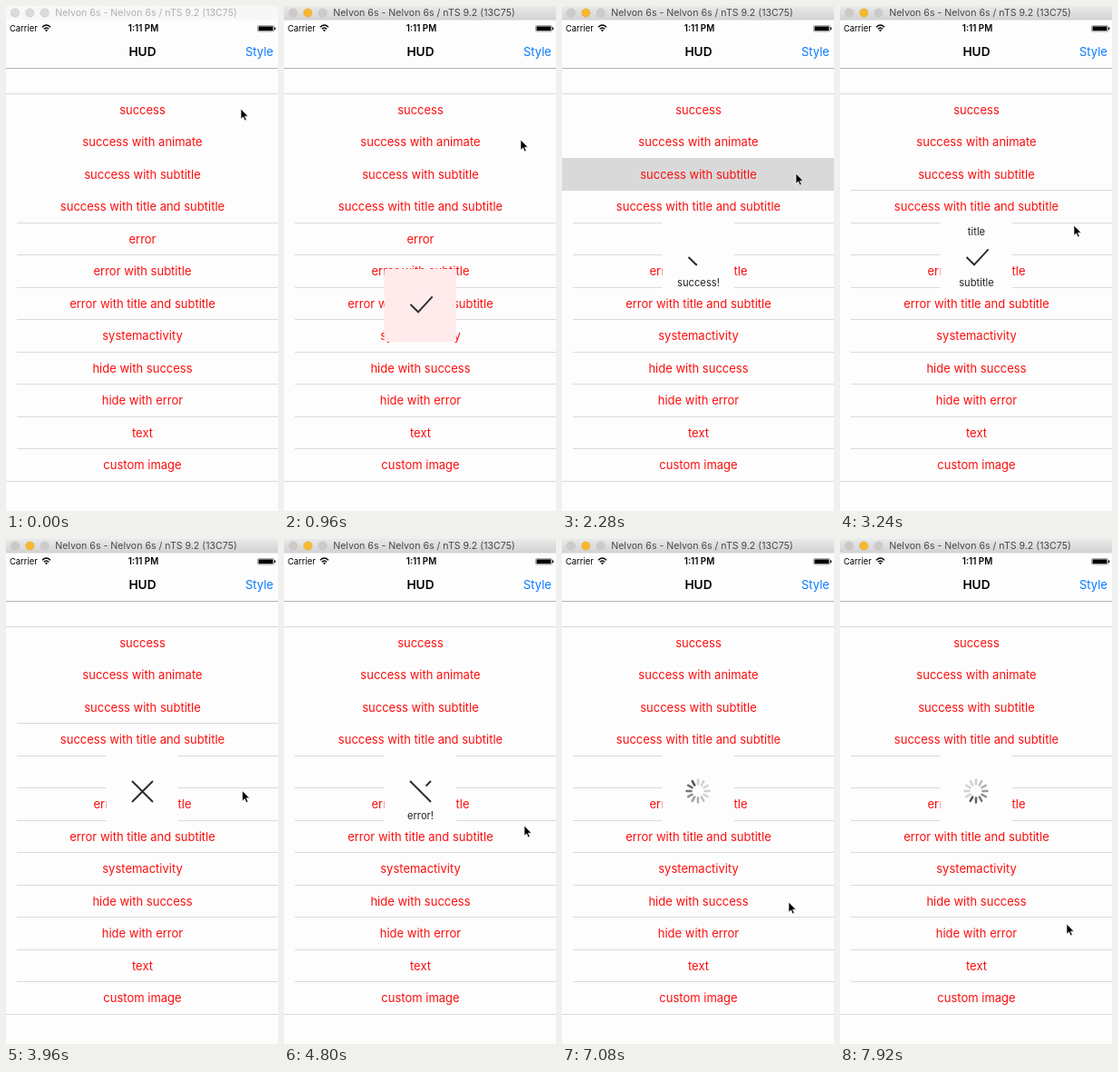
Animation, 300 px wide and 555 px high, one loop 8000 ms. Source, as an HTML page:

```html
<!DOCTYPE html>
<html lang="en">
<head>
<meta charset="utf-8">
<title>HUD demo</title>
<style>
  html, body { margin: 0; width: 100%; height: 100%; overflow: hidden; background: #fdfdfd; }
  svg { display: block; width: 300px; height: 555px; font-family: Inter, Roboto, sans-serif; }
  .mid { text-anchor: middle; }
  .row { font-size: 13px; fill: #fd0e0e; }
  .note { font-size: 11.2px; fill: #262323; }
  .line { stroke: #dadada; stroke-width: 1; }
  .mark { fill: none; stroke: #2e2a2a; stroke-width: 1.9; }
</style>
</head>
<body>
<svg viewBox="0 0 300 555">
  <defs>
    <linearGradient id="chrome" x2="0" y2="1">
      <stop offset="0" stop-color="#e9e9e9"/>
      <stop offset="1" stop-color="#d2d2d2"/>
    </linearGradient>
  </defs>
  <rect width="300" height="555" fill="#fdfdfd"/>

  <rect id="bar" width="300" height="15.5"/>
  <g id="lights" stroke-width=".6">
    <circle cx="10" cy="7.5" r="4.6"/>
    <circle cx="26.3" cy="7.5" r="4.6"/>
    <circle cx="42.6" cy="7.5" r="4.6"/>
  </g>
  <text id="caption" class="mid" x="154.5" y="11.3" font-size="10.6">Nelvon 6s - Nelvon 6s / nTS 9.2 (13C75)</text>

  <text x="4" y="28" font-size="9.4">Carrier</text>
  <g fill="none" stroke="#000" stroke-width="1.4">
    <path d="M40 23.2Q44.5 18.8 49 23.2"/>
    <path d="M41.8 25.2Q44.5 22.6 47.2 25.2"/>
  </g>
  <path d="M43 26.4Q44.5 25.2 46 26.4L44.5 28.2Z"/>
  <text class="mid" x="151.5" y="28" font-size="9.8" font-weight="600">1:11 PM</text>
  <rect x="277.5" y="21.5" width="18" height="6.5" rx="1" fill="none" stroke="#8a8a8a" stroke-width=".7"/>
  <rect x="278.5" y="22.4" width="16" height="4.8"/>
  <rect x="296" y="23.4" width="1.2" height="2.8"/>

  <text class="mid" x="150.5" y="55" font-size="13.7" font-weight="600">HUD</text>
  <text x="264" y="55" font-size="13" fill="#0a7aff">Style</text>
  <path d="M0 68.5H300" stroke="#b4b4b4"/>

  <rect id="glow" width="300" height="36" fill="#d9d9d9"/>
  <g id="list"></g>

  <g id="hud">
    <rect id="box" x="110.5" y="237" width="79.5" height="80" rx="2"/>
    <text id="head" class="note mid" x="150.5" y="251.5"></text>
    <path id="a" class="mark" pathLength="1"/>
    <path id="b" class="mark" pathLength="1"/>
    <g id="spin" stroke-width="2.5" stroke-linecap="round"></g>
    <text id="foot" class="note mid" x="150.5" y="307.5"></text>
  </g>

  <path id="cursor" d="M0 0V11.3L2.6 8.9L4.4 13L6.3 12.2L4.5 8.2H8Z" fill="#000" stroke="#fff" stroke-width=".7"/>
</svg>

<script>
const LOOP = 8000, STEP = 120, TOP = 96, PITCH = 35.5, DRAW = 320;
const $ = id => document.getElementById(id);

const rows = ["success", "success with animate", "success with subtitle",
  "success with title and subtitle", "error", "error with subtitle",
  "error with title and subtitle", "systemactivity", "hide with success",
  "hide with error", "text", "custom image"];

// Press time of each row, top to bottom
const taps = [240, 1320, 2280, 2760, 3480, 4440, 5160, 5760, 6600, 7440];

const huds = [
  { at: 361, end: 1200, kind: "check", drop: 52, fill: "#ffebeb" },
  { at: 1441, kind: "check" },
  { at: 2161, kind: "check", foot: "success!" },
  { at: 2880, kind: "check", head: "title", foot: "subtitle" },
  { at: 3600, kind: "cross" },
  { at: 4602, kind: "cross", foot: "error!" },
  { at: 5280, kind: "cross", head: "title", foot: "subtitle" },
  { at: 5880, kind: "spin", phase: 154 },
  { at: 7560, kind: "spin", phase: 327 }
];

const marks = {
  check: ["M139.5 276L148 284.3L163.7 267.3", ""],
  cross: ["M139 266L162 289", "M162 266L139 289"]
};

// time, x, y of the pointer tip
const track = [
  [0, 259, 113], [480, 259, 113], [840, 261, 147], [1440, 261, 147],
  [1800, 258, 184], [2400, 258, 184], [2700, 259, 218], [2940, 259, 220],
  [3240, 258, 241], [3480, 258, 254], [3720, 258, 254], [4080, 262, 288],
  [4560, 262, 290], [4800, 265, 315], [4920, 265, 322], [5280, 265, 322],
  [5640, 258, 357], [6000, 258, 357], [6480, 250, 397], [7080, 250, 399],
  [7200, 250, 401], [7440, 250, 423], [LOOP, 250, 423]
];

const clamp = v => Math.max(0, Math.min(1, v));
const rowTop = i => Math.floor(TOP + i * PITCH);

function add(parent, tag, attrs, text = "") {
  const el = document.createElementNS("http://www.w3.org/2000/svg", tag);
  for (const k in attrs) el.setAttribute(k, attrs[k]);
  el.textContent = text;
  return parent.appendChild(el);
}

const rule = (i, x) =>
  add($("list"), "path", { class: "line", d: `M${x} ${rowTop(i) + .5}H300` });

rule(0, 0);
rows.forEach((name, i) =>
  add($("list"), "text", { class: "row mid", x: 150.5, y: rowTop(i) + 22.5 }, name));
const thirdRule = rule(3, 12);
for (let i = 4; i < rows.length; i++) rule(i, 12);
rule(rows.length, 0);

const spokes = Array.from({ length: 12 }, (_, i) =>
  add($("spin"), "path", { d: "M150 269.5V264.5", transform: `rotate(${i * 30} 150 277)` }));

function drawBar(active) {
  $("bar").setAttribute("fill", active ? "url(#chrome)" : "#f7f7f7");
  $("caption").setAttribute("fill", active ? "#484848" : "#b0b0b0");
  const fills = active ? ["#cdc9c9", "#f8b830", "#cbcbcb"] : Array(3).fill("#dcdcdc");
  [...$("lights").children].forEach((c, i) => {
    c.setAttribute("fill", fills[i]);
    c.setAttribute("stroke", active && i === 1 ? "#e6a626" : "#c2c2c2");
  });
}

function drawGlow(t) {
  const i = taps.findLastIndex(at => t >= at);
  $("glow").setAttribute("y", rowTop(Math.max(i, 0)));
  $("glow").setAttribute("opacity", i < 0 ? 0 : clamp((360 - t + taps[i]) / 240));
}

function stroke(el, d, p) {
  el.setAttribute("d", d);
  el.setAttribute("stroke-dasharray", `${clamp(p)} 2`);
  el.style.display = d && p > 0 ? "" : "none";
}

function drawHud(t) {
  const h = huds.findLast(h => t >= h.at);
  const shown = h && !(t >= h.end);
  $("hud").style.display = shown ? "" : "none";
  if (!shown) return;
  $("hud").setAttribute("transform", `translate(0 ${h.drop || 0})`);
  $("box").setAttribute("fill", h.fill || "#fdfdfd");
  $("head").textContent = h.head || "";
  $("foot").textContent = h.foot || "";

  const [a, b] = marks[h.kind] || ["", ""];
  const p = (t - h.at) / DRAW * (b ? 2 : 1);
  stroke($("a"), a, p);
  stroke($("b"), b, p - 1);

  const spinning = h.kind === "spin";
  $("spin").style.display = spinning ? "" : "none";
  if (!spinning) return;
  const lead = Math.floor((t - h.phase) / 1000 * 12);
  spokes.forEach((s, i) => {
    const age = ((lead - i) % 12 + 12) % 12;
    const g = Math.min(208, 82 + age * 18);
    s.setAttribute("stroke", `rgb(${g + 4},${g},${g})`);
  });
}

function drawCursor(t) {
  const i = track.findLastIndex(k => t >= k[0]);
  const [t0, x0, y0] = track[i];
  const [t1, x1, y1] = track[i + 1];
  const u = (t - t0) / (t1 - t0);
  $("cursor").setAttribute("transform",
    `translate(${x0 + (x1 - x0) * u} ${y0 + (y1 - y0) * u})`);
}

function frame() {
  const t = Math.floor(performance.now() % LOOP / STEP) * STEP;
  drawBar(t >= 240);
  drawGlow(t);
  thirdRule.style.display = t >= 2640 && t < 4440 ? "" : "none";
  drawHud(t);
  drawCursor(t);
  requestAnimationFrame(frame);
}
frame();
</script>
</body>
</html>
```
